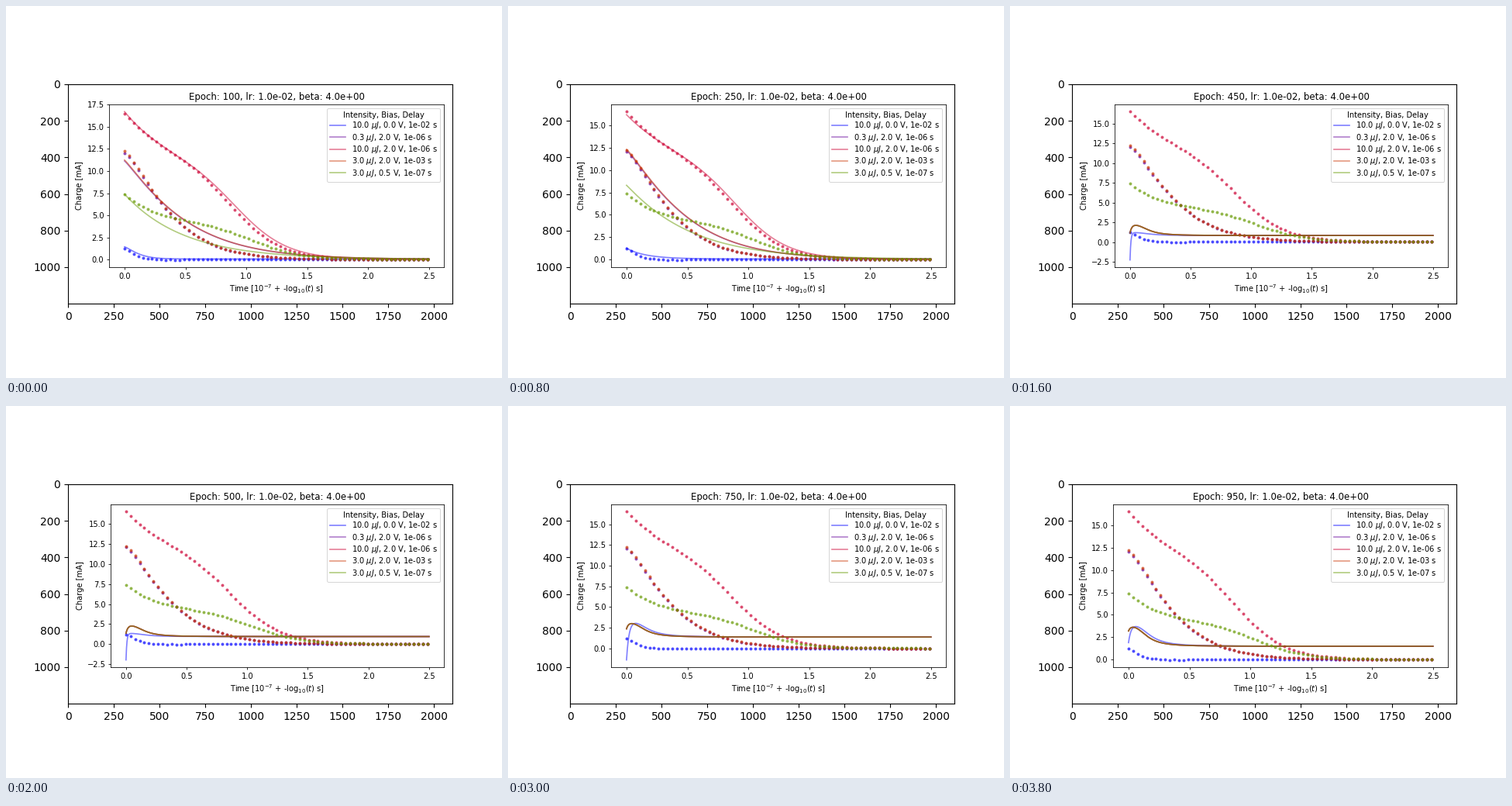
Recreate the animation shown at these times as a matplotlib script. Size 640 px wide and 480 px high, loop 4 s.

```python
import numpy as np
import matplotlib.pyplot as plt
from matplotlib.animation import FuncAnimation

W, H, DPI = 640, 480, 100
S = 496 / 2100 * 3          # inner plot: 7x4 in at 300 dpi, shown 496 px wide
TOP, BOTTOM, RIGHT = 126.7, 337.2, 565.4

# Snapshots play in alphabetical order of their epoch number
EPOCHS = sorted(range(50, 1001, 50), key=str)

LABELS = [
    r"10.0 $\mu J$, 0.0 V, 1e-02 s",
    r"0.3 $\mu J$, 2.0 V, 1e-06 s",
    r"10.0 $\mu J$, 2.0 V, 1e-06 s",
    r"3.0 $\mu J$, 2.0 V, 1e-03 s",
    r"3.0 $\mu J$, 0.5 V, 1e-07 s",
]
COLORS = plt.get_cmap("brg")(np.linspace(0, 1, 6))[:5]


def decay(x, height, tau, power=1.0):
    return height * np.exp(-(x / tau) ** power)


def shoulder(x, height, tau, step, center, width):
    """Fast decay on top of a sigmoid step."""
    return decay(x, height, tau) + step / (1 + np.exp((x - center) / width))


# Measured data
td = np.arange(67) * .0377
noise = np.random.default_rng(4).uniform(-.03, .03, td.size)
blue_dots = (decay(td, 1.2, .1, 1.4) + noise * decay(td, 1, 1) * (td > .2)
             - .05 * np.exp(-((td - .38) / .12) ** 2) + .02)
red_dots = decay(td, 12.2, .427, 1.29) + .04
DOTS = [
    blue_dots,
    red_dots * .985,
    shoulder(td, 5.75, .38, 10.9, .88, .2),
    red_dots,
    shoulder(td, 3.2, .25, 4.2, 1.05, .2) + .04,
]

t = np.linspace(0, 2.5, 1200)


def fitted(epoch):
    """Curves that follow the data, drifting with the epoch."""
    k = (epoch - 100) / 150

    def mix(a, b):
        return np.array(a) + (np.array(b) - a) * k

    blue = decay(t, *mix([1.37, .13, 1.3], [1.22, .16, .95])) + .08
    pink = shoulder(t, *mix([5.95, .36, 10.9, .92, .21],
                            [5.4, .4, 10.9, .91, .205]))
    red = decay(t, *mix([11.2, .528, 1.12], [12.25, .518, 1.17])) + .05
    olive = decay(t, *mix([7.35, .49, 1], [8.25, .53, 1.04])) + .05
    return [blue, red * .99, pink, red, olive]


def bump(level, peak, start, tau, width):
    fall = 1 / (1 + (t / width) ** 2.8)
    return level + (peak - level) * fall - decay(t, peak - start, tau)


def collapsed(epoch):
    """Curves stuck on one shared plateau that slowly rises."""
    s = (epoch - 450) / 500
    level = 1.5 - .68 * (1 - s) ** 2
    peak = 2.2 + 1.5 * s
    dip = np.interp(epoch, [350, 400, 450, 500, 550, 600, 900, 950],
                    [-6.5, -5.7, -2.27, -1.96, -2.6, -2.45, -.29, 1.9])
    if epoch > 500:
        blue = bump(level, peak + .2, dip, .02, .18)
    else:
        blue = bump(level, peak - 1, dip, .007, .165)
    return [blue] + [bump(level, peak, 1.15 + 2.05 * s, .015, .155)] * 4


fig, outer = plt.subplots(figsize=(W / DPI, H / DPI), dpi=DPI)
outer.set(xlim=(-.5, 2099.5), ylim=(1199.5, -.5), aspect="equal",
          xticks=range(0, 2001, 250), yticks=range(0, 1001, 200))

inner = fig.add_axes([.2, .3, .6, .4])
inner.tick_params(length=3.5 * S, width=.8 * S, pad=3.5 * S, labelsize=10 * S)
for spine in inner.spines.values():
    spine.set_linewidth(.8 * S)
title = inner.set_title("", fontsize=12 * S, pad=6 * S)
inner.set_xlabel(r"Time [$10^{-7}$ + -log$_{10}$($t$) s]",
                 fontsize=10 * S, labelpad=3.2 * S)
inner.set_ylabel("Charge [mA]", fontsize=10 * S, labelpad=4 * S)

lines = []
for label, color, dots in zip(LABELS, COLORS, DOTS):
    lines += inner.plot(t, 0 * t, color=color, alpha=.5, lw=1.7 * S, label=label)
    inner.plot(td, dots, "o", color=color, alpha=.7, ms=4 * S, mew=0, snap=False)
legend = inner.legend(title="Intensity, Bias, Delay", loc="upper right",
                      fontsize=10 * S, title_fontsize=10 * S, labelspacing=.15)
legend.get_frame().set_linewidth(S)


def draw(i):
    epoch = EPOCHS[i]
    title.set_text(f"Epoch: {epoch}, lr: 1.0e-02, beta: 4.0e+00")
    curves = fitted(epoch) if epoch <= 300 else collapsed(epoch)
    for line, y in zip(lines, curves):
        line.set_data(t, y)
    inner.relim()
    inner.autoscale_view()
    # The left edge follows the widest tick label
    lo, hi = inner.get_ylim()
    left = 125.8 if hi - lo > 22.5 else 135.3 if lo <= -2.5 else 133.3
    inner.set_position([left / W, 1 - BOTTOM / H,
                        (RIGHT - left) / W, (BOTTOM - TOP) / H])
    return lines


anim = FuncAnimation(fig, draw, frames=len(EPOCHS), interval=200,
                     init_func=lambda: draw(0), repeat=True)
plt.show()
```
